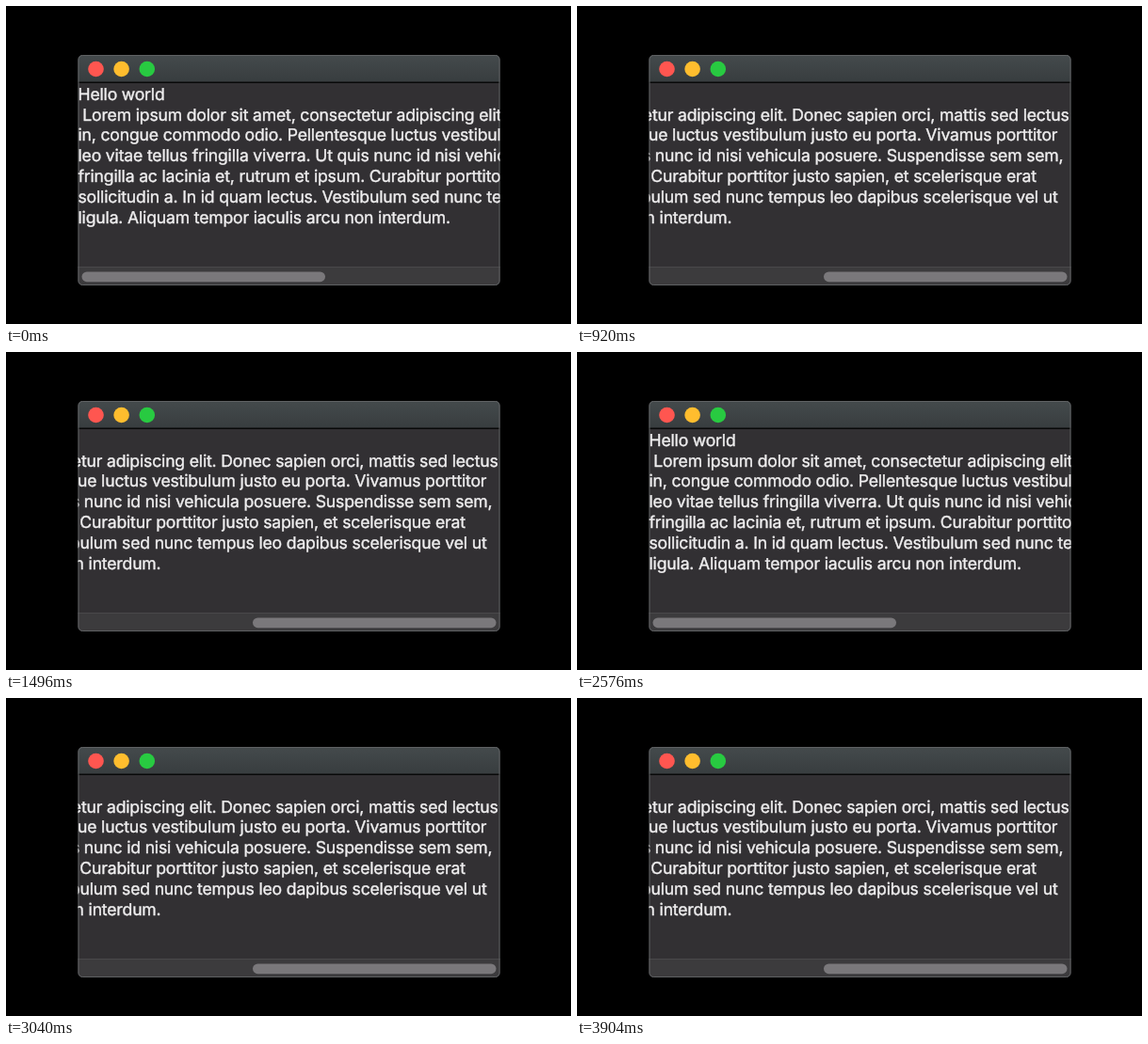
Animation of 600x338 px, one loop 4480 ms. Source, as an HTML page:

```html
<!DOCTYPE html>
<html lang="la">
<head>
<meta charset="utf-8">
<title>Scrolling text window</title>
<style>
  html, body { margin: 0; width: 100%; height: 100%; overflow: hidden; background: #000; }
  svg { display: block; width: 600px; height: 338px; }
  text {
    font: 400 17.6px Inter, "Liberation Sans", sans-serif;
    letter-spacing: -0.17px;
    fill: #f0eff0;
    stroke: #f0eff0;
    stroke-width: 0.4px;
    white-space: pre;
    text-rendering: geometricPrecision;
  }
</style>
</head>
<body>
<svg viewBox="0 0 600 338">
  <defs>
    <linearGradient id="bar" x1="0" y1="0" x2="0" y2="1">
      <stop offset="0" stop-color="#444a4c"/>
      <stop offset="1" stop-color="#383d3f"/>
    </linearGradient>
    <clipPath id="frame"><rect x="76.5" y="52" width="448" height="245" rx="5"/></clipPath>
    <clipPath id="view"><rect x="76.5" y="82" width="448" height="195"/></clipPath>
  </defs>
  <g clip-path="url(#frame)">
    <rect x="76" y="52" width="449" height="245" fill="#323033"/>
    <rect x="76" y="52" width="449" height="29" fill="url(#bar)"/>
    <rect x="76" y="80.5" width="449" height="1.5" fill="#080909"/>
    <rect x="76" y="277" width="449" height="20" fill="#3c3b3d"/>
    <rect x="76" y="277" width="449" height="1" fill="#49484a"/>
  </g>
  <circle cx="95.5" cy="67" r="8.3" fill="#ff5650"/>
  <circle cx="122.6" cy="67" r="8.3" fill="#ffbd2e"/>
  <circle cx="149.8" cy="67" r="8.3" fill="#28ca41"/>
  <rect x="77" y="52.5" width="447" height="244" rx="4.5" fill="none" stroke="#5f6163"/>
  <g clip-path="url(#view)"><g id="copy"></g></g>
  <rect id="thumb" x="80.5" y="282.4" width="258.5" height="10.8" rx="5.4" fill="#7a787b"/>
</svg>
<script>
  const lines = [
    "Hello world",
    " Lorem ipsum dolor sit amet, consectetur adipiscing elit. Donec sapien orci, mattis sed lectus",
    "in, congue commodo odio. Pellentesque luctus vestibulum justo eu porta. Vivamus porttitor",
    "leo vitae tellus fringilla viverra. Ut quis nunc id nisi vehicula posuere. Suspendisse sem sem,",
    "fringilla ac lacinia et, rutrum et ipsum. Curabitur porttitor justo sapien, et scelerisque erat",
    "sollicitudin a. In id quam lectus. Vestibulum sed nunc tempus leo dapibus scelerisque vel ut",
    "ligula. Aliquam tempor iaculis arcu non interdum."
  ];
  const copy = document.getElementById("copy");
  const thumb = document.getElementById("thumb");

  lines.forEach((line, i) => {
    const row = document.createElementNS("http://www.w3.org/2000/svg", "text");
    row.setAttribute("x", 76.5);
    row.setAttribute("y", 99.6 + i * 21.9);
    row.textContent = line;
    copy.append(row);
  });

  // Start time in ms and scroll position (0 = left end, 1 = right end).
  const steps = [[0, 0], [920, 1], [1880, 0], [3040, 1]];
  const period = 4480;

  function draw() {
    const t = performance.now() % period;
    const pos = steps.findLast(([start]) => t >= start)[1];
    copy.setAttribute("transform", `translate(${-307.5 * pos} 0)`);
    thumb.setAttribute("transform", `translate(${181.5 * pos} 0)`);
    requestAnimationFrame(draw);
  }
  draw();
</script>
</body>
</html>
```
